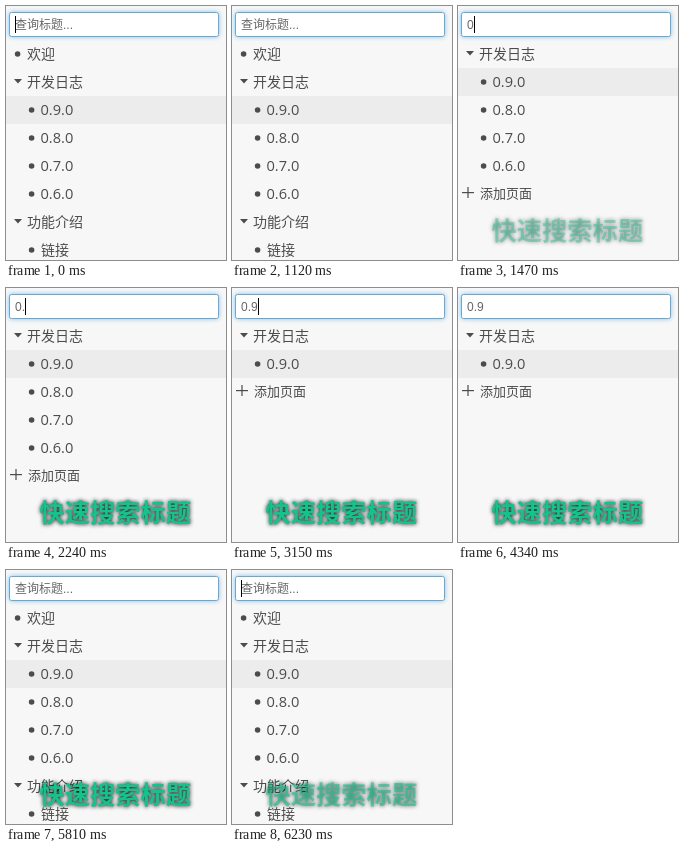
Recreate the animation shown at these times as an HTML page with a canvas. Size 220 px wide and 254 px high, loop 6.3 s.

```html
<!DOCTYPE html>
<html lang="zh-CN">
<head>
<meta charset="utf-8">
<style>
  html, body { margin: 0; width: 100%; height: 100%; overflow: hidden; background: #f7f7f7; }
  canvas { display: block; }
</style>
</head>
<body>
<canvas width="220" height="254"></canvas>
<script>
const ctx = document.querySelector('canvas').getContext('2d');
const LOOP = 6300, STEP = 70, ROW = 28, INK = '#4c4c4c';
const CJK = '"Noto Sans CJK SC", "Noto Sans CJK", sans-serif';
const LATIN = '"Open Sans", sans-serif';
const INPUT = `"Liberation Sans", ${CJK}`;
const VERSIONS = ['0.9.0', '0.8.0', '0.7.0', '0.6.0'];

// [time, query]
const typing = [[0, ''], [1190, '0'], [2240, '0.'], [2660, '0.9'], [4480, '0.'], [4970, '0'], [5530, '']];
// [time, caret visible]
const blinking = [[0, true], [560, false], [1470, true], [3290, false], [3780, true],
  [4340, false], [4900, true], [5390, false], [5880, true]];

const at = (keys, t) => keys.filter(([time]) => time <= t).pop()[1];

function text(str, x, y, font, color = INK) {
  ctx.font = font;
  ctx.fillStyle = color;
  ctx.fillText(str, x, y);
}

function bullet(x, y) {
  ctx.fillStyle = INK;
  ctx.beginPath();
  ctx.arc(x, y, 2.8, 0, Math.PI * 2);
  ctx.fill();
}

function item(label, y, indent = 0) {
  bullet(11.6 + indent, y);
  const latin = /\d/.test(label);
  text(label, 21 + indent - (latin ? .5 : 0), y + 5, latin ? `14.6px ${LATIN}` : `14px ${CJK}`);
}

function group(label, y) {
  ctx.fillStyle = INK;
  ctx.beginPath();
  ctx.moveTo(8, y - 3);
  ctx.lineTo(16, y - 3);
  ctx.lineTo(12, y + 1.5);
  ctx.fill();
  text(label, 21, y + 5, `14px ${CJK}`);
}

function addButton(y) {
  ctx.fillStyle = INK;
  ctx.fillRect(4, y - 2, 12, 1.2);
  ctx.fillRect(9.4, y - 7, 1.2, 11);
  text('添加页面', 22, y + 4, `13px ${CJK}`);
}

function drawList(query) {
  const versions = VERSIONS.filter(v => v.startsWith(query));
  let y = 48;
  const next = () => (y += ROW) - ROW;

  ctx.fillStyle = '#ececec';
  ctx.fillRect(0, query ? 62 : 90, 220, ROW);
  if (!query) item('欢迎', next());
  group('开发日志', next());
  versions.forEach(v => item(v, next(), 14));
  if (query) return addButton(y);
  group('功能介绍', next());
  item('链接', next(), 14);
}

function drawInput(query, caret) {
  ctx.save();
  ctx.shadowColor = '#6db6e8';
  ctx.shadowBlur = 5;
  ctx.fillStyle = '#fff';
  ctx.strokeStyle = '#66a9d4';
  ctx.beginPath();
  ctx.roundRect(3.5, 6.5, 209, 24, 2);
  ctx.fill();
  ctx.shadowBlur = 0;
  ctx.stroke();
  ctx.restore();

  text(query || '查询标题...', 9, 23, `12px ${INPUT}`, '#666');
  if (caret) {
    ctx.fillStyle = '#000';
    ctx.fillRect(Math.round(9 + (query ? ctx.measureText(query).width : 0)), 10, 1, 17);
  }
}

function drawCaption(alpha) {
  ctx.save();
  ctx.globalAlpha = alpha;
  ctx.textAlign = 'center';
  ctx.shadowColor = '#000';
  ctx.shadowBlur = 4;
  text('快速搜索标题', 109.3, 234, `bold 25.3px ${CJK}`, '#12c48b');
  ctx.restore();
}

function captionAlpha(t) {
  if (t < 1470) return 0;
  return t < 6230 ? Math.min(1, (t - 1330) / 350) : .6;
}

function frame(now) {
  const t = Math.floor(now % LOOP / STEP) * STEP;
  const query = at(typing, t);
  ctx.fillStyle = '#f7f7f7';
  ctx.fillRect(0, 0, 220, 254);
  drawList(query);
  drawInput(query, at(blinking, t));
  drawCaption(captionAlpha(t));
  requestAnimationFrame(frame);
}
requestAnimationFrame(frame);
</script>
</body>
</html>
```
